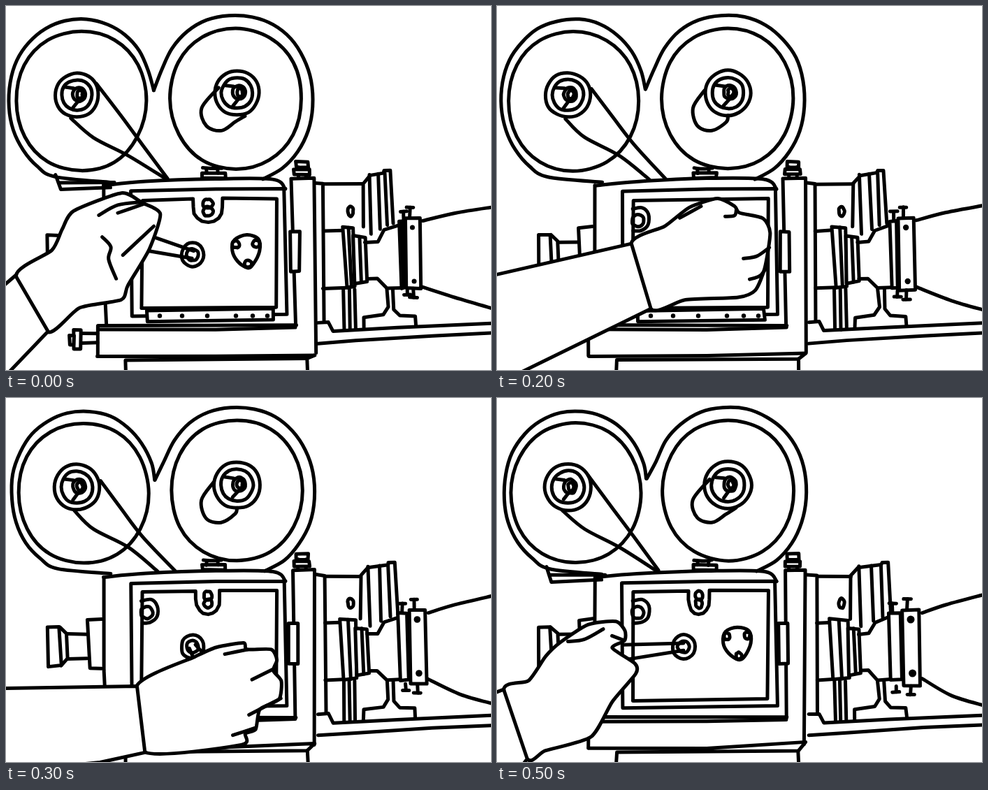
An HTML page with a canvas for the animation above (0.6 s loop, 694 by 521 pixels).

```html
<!DOCTYPE html>
<html lang="en">
<head>
<meta charset="utf-8">
<title>Hand-cranked film camera</title>
<style>
html, body { margin: 0; width: 100%; height: 100%; overflow: hidden; background: #fff; }
canvas { display: block; }
</style>
</head>
<body>
<canvas id="stage" width="694" height="521"></canvas>
<script>
const ctx = document.getElementById('stage').getContext('2d');
const { PI, sin, cos, sign, abs, hypot } = Math;

// Seeded wobble: every pose is inked anew
let seed = 1;
function wobble() {
  seed = seed * 16807 % 2147483647;
  return (seed / 2147483647 - .5) * 1.2;
}

// Inks a flat list x, y, x, y...; bend 0 is straight, 1/6 a smooth curve
function ink(flat, { bend = 0, closed = false, fill = false } = {}) {
  const p = [];
  for (let i = 0; i < flat.length; i += 2) p.push([flat[i] + wobble(), flat[i + 1] + wobble()]);
  const n = p.length;
  const at = i => closed ? p[(i + n) % n] : p[Math.max(0, Math.min(n - 1, i))];
  ctx.beginPath();
  ctx.moveTo(...p[0]);
  for (let i = 0; i < (closed ? n : n - 1); i++) {
    const [a, b, c, d] = [at(i - 1), at(i), at(i + 1), at(i + 2)];
    ctx.bezierCurveTo(b[0] + (c[0] - a[0]) * bend, b[1] + (c[1] - a[1]) * bend,
      c[0] - (d[0] - b[0]) * bend, c[1] - (d[1] - b[1]) * bend, c[0], c[1]);
  }
  if (closed) ctx.closePath();
  if (fill) { ctx.fillStyle = fill; ctx.fill(); }
  ctx.stroke();
}

const line = (...n) => ink(n);
const curve = (...n) => ink(n, { bend: 1 / 6 });
const patch = (...n) => ink(n, { closed: true, fill: '#fff' });
const box = (x, y, w, h) => patch(x, y, x + w, y, x + w, y + h, x, y + h);

// Points on a slightly squared ellipse, angles in degrees
function arc(x, y, rx, ry, from, to, steps = 14) {
  const round = v => sign(v) * abs(v) ** .96;
  return Array.from({ length: steps + 1 }, (_, i) => {
    const a = (from + (to - from) * i / steps) * PI / 180;
    return [x + rx * round(cos(a)), y + ry * round(sin(a))];
  }).flat();
}
const ring = (x, y, rx, ry = rx, fill = false) =>
  ink(arc(x, y, rx, ry, 0, 330, 11), { bend: 1 / 6, closed: true, fill });

function dot(x, y, r) {
  ctx.beginPath();
  ctx.arc(x, y, r, 0, 7);
  ctx.fillStyle = '#000';
  ctx.fill();
}

function screw(x, y, stem) {
  line(x - 5, y, x + 5, y);
  line(x, y, x, y + stem);
}

function hub(x, y, r) {
  for (const size of [1, .7]) ring(x, y, r * size);
  ring(x + 3, y - 1, 9, 10);
  ring(x + 4, y - 1, 4, 6);
  line(x - 17, y - 11, x - 5, y - 10);
  line(x - 6, y + 18, x + 1, y + 9);
}

// drift runs from -1 to 1 through the loop; slack is widest at mid-loop
function reels(drift, slack) {
  const notch = [213 + drift, 118 - 3 * drift];
  curve(...notch, ...arc(110 + 3 * drift, 135, 103, 116, -20, -250), 150, 252);
  curve(...notch, ...arc(330 + 2 * drift, 134, 111, 121, -160, 70));
  ring(110 + 2.5 * drift, 136, 93, 100);
  ring(330 + drift, 132.5, 94, 100.5);
  hub(101.5, 127.5, 32 + drift);
  hub(330.5, 124.5, 32.5 + drift);
  curve(304 - 8 * slack, 117 + 4 * slack, 280, 146, 287, 172, 308, 178, 328, 166, 342 - 12 * slack, 157);
  curve(130 + 5 * slack, 111 + 8 * slack, 165, 158, 196, 199, 231 + 11 * slack, 247);
  curve(93 + 5 * slack, 161, 125, 188, 175, 214, 229 - 12 * slack, 248);
}

function eyepiece() {
  patch(59, 328, 76, 328, 79, 383, 60, 385);
  line(77, 328, 87, 337, 88, 372, 79, 383);
  for (const y of [338, 373]) line(88, y, 116, y);
  line(137, 316, 117, 318, 120, 387, 137, 387);
}

function sidePlate() {
  line(71, 242, 78, 263, 150, 260);
  line(77, 253, 155, 253);
}

function sideKnob() {
  box(97, 464, 10, 27);
  box(91, 472, 6, 13);
  for (const y of [469, 482]) line(108, y, 131, y);
}

function hingeStrip() {
  patch(201, 436, 382, 433, 383, 449, 202, 452);
  for (const x of [220, 252, 288, 329, 353, 374]) dot(x, 443.5, 3.2);
}

function shield(drift) {
  ink([327, 335, 344, 328, 361, 334, 363, 351, 354, 369, 345, 375, 331, 365, 324, 350],
    { bend: 1 / 6, closed: true });
  const r = 4.5 - drift * .5;
  for (const [x, y] of [[329, 341], [358, 340], [346, 369]]) ring(x, y, r, 5, '#fff');
}

function crank([x, y]) {
  const [ax, ay] = [267, 356];
  const reach = hypot(x - ax, y - ay), nx = (y - ay) / reach, ny = (ax - x) / reach;
  for (const side of [-1, 1]) {
    line(ax + nx * 5 * side, ay + ny * 5 * side, x + nx * 11 * side, y + ny * 11 * side);
  }
  ring(ax, ay, 16, 17);
  ring(ax, ay, 8.5);
}

function body(drift, latch) {
  curve(282, 232, 295, 233, 308, 232);
  box(281, 239, 33, 7);
  for (const x of [287, 303]) line(x, 233, x, 239);
  curve(140, 257, 200, 251, 300, 247, 382, 248, 400, 262);
  line(140, 257, 140, 390, 144, 457);
  line(400, 262, 300, 262, 179, 265, 180, 444, 402, 441, 398, 262);

  const half = 18 - 3 * drift;
  const cup = latch ? arc(289, 288, half, 22, 180, 0, 8) : [];
  line(194, 433, 195, 278, ...(latch ? [289 - half, 276] : []), ...cup,
    ...(latch ? [289 + half, 275] : []), 388, 276, 387, 431, 194, 433);
  if (latch) for (const y of [283, 294]) ring(289, y, 6 - drift, 6.5);
  curve(194, 291, 208, 289, 217, 298, 216, 313, 207, 321, 195, 322);
  ring(201.5, 307, 8.5);

  line(131, 501, 131, 457, 415, 457);
  line(133, 463, 300, 463, 414, 460);
  line(131, 501, 300, 501, 442, 496 - 3.5 * drift, 431, 505, 171, 507, 171, 525);
  line(431, 505, 432, 525);
}

function post(drift) {
  const left = 410 + 2.5 * drift, right = 441;
  line(414, 458, left, 247, right, 246, 442 - 2 * drift, 496);
  line(right + 2, 253, 456 + 2 * drift, 254, 457 + 2 * drift, 450);
  box(415, 223, 17, 8);
  for (const x of [418, 429]) line(x, 231, x, 245);
  box(412, 234, 22, 7);
  box(405 - 2 * drift, 323, 13, 57);
}

function lens(drift) {
  const edge = 456 + 2 * drift;
  const hood = 508.5 - 2.5 * drift, rim = 555 + 5 * drift;
  const band = 478.5 - 3.5 * drift, bandEnd = band + 21 + 6 * drift;
  const collar = 516 + 2 * drift;
  const thin = 561.5 - 1.5 * drift, wide = 575.5 + 4.5 * drift;
  const front = 598 + 6 * drift, foot = 408 + 4 * drift;

  line(edge, 255, hood, 255);
  ring(493, 294, 4, 7);
  line(hood, 316, hood, 254, hood + 10, 243, rim - 10, 239, rim - 9, 235, rim, 235, rim + 4, 311);
  for (const part of [.22, .54, .8]) {
    const x = hood + (rim - hood) * part;
    line(x, 242 - 4 * part, x + 3, 331 - 22 * part);
  }

  line(edge, 322, band, 321);
  line(edge, 404, band + 6, 403);
  patch(band, 316, bandEnd, 318, bandEnd + 2, 401, band + 6, 403);
  line((band + bandEnd) / 2 + 1, 317, (band + bandEnd) / 2 + 5, 402);
  patch(bandEnd, 329, collar, 331, collar + 3, 394, bandEnd + 2, 397);
  line((bandEnd + collar) / 2, 330, (bandEnd + collar) / 2 + 3, 395);
  for (const x of [483, 491, 499]) line(x, 405, x + 1, 463);

  line(collar, 338, 532, 337, 541, 321, thin, 314);
  line(collar + 3, 390, 531, 390, 545, 404, thin + 3, 403);
  patch(thin, 308, wide - 3, 308, wide - 1, 403, thin + 3, 404);
  patch(wide, 304, front, 303, front + 2, foot, wide + 2, foot);
  for (const y of [317, 394]) dot((wide + front) / 2 + (y - 317) / 30, y, 4.5 + drift);
  screw(thin + 6, 294, 13);
  screw(wide + 7, 288, 14);
  screw(thin + 11, foot + 9, -9);
  screw(wide + 12, foot + 13, -13);

  curve(front + 4, 307, 643, 296, 698, 284 - 3 * drift);
  curve(front + 4, 402, 650, 423 + 3 * drift, 698, 437 + 3.5 * drift);
  line(545, 405, 547, 431, 540, 442, 512, 446, 512, 461);
  line(554, 405, 555, 434, 563, 443, 585, 444, 586, 457);
  line(446, 453, 461, 452, 468, 465, 560, 460, 698, 454);
  line(446, 483, 500, 479, 610, 472, 698, 468);
}

// The hand outline runs from the top of the cuff to its bottom;
// the sleeve goes on from there to the stage edge.
function arm({ hand, folds, sleeve: [top, x, y] }) {
  ink(hand, { bend: 1 / 9, closed: true, fill: '#fff' });
  for (const fold of folds) curve(...fold);
  patch(-9, top, ...hand.slice(0, 2), ...hand.slice(-2), x, y, -9, 535);
}

const poses = [
  { parts: [sidePlate, sideKnob, eyepiece, hingeStrip, shield], latch: true, grip: [203, 339],
    hand: [14, 386, 65, 350, 80, 320, 97, 293, 165, 268, 194, 281, 221, 297, 205, 348, 175, 400, 165, 420, 105, 432, 60, 466],
    folds: [[133, 300, 160, 285, 194, 281], [160, 296, 197, 283], [212, 315, 167, 357], [138, 331, 150, 345, 147, 362, 158, 390]],
    sleeve: [405, 3, 526] },
  { parts: [sidePlate, sideKnob, hingeStrip, shield], latch: true, grip: [245, 314],
    hand: [57, 335, 100, 310, 125, 262, 200, 228, 225, 213, 242, 213, 247, 230, 237, 248, 268, 258, 264, 281, 250, 290, 241, 338, 165, 385, 106, 410],
    folds: [[247, 230, 222, 250], [208, 267, 235, 253, 262, 254], [210, 300, 252, 287], [207, 333, 244, 317]],
    sleeve: [374, 10, 525] },
  { parts: [eyepiece, hingeStrip], latch: false, grip: [300, 340],
    hand: [192, 340, 240, 315, 275, 288, 315, 275, 340, 286, 347, 296, 380, 304, 391, 325, 383, 375, 370, 407, 345, 417, 270, 421, 220, 433],
    folds: [[326, 301, 340, 300, 343, 291], [353, 362, 372, 358, 390, 346], [362, 391, 376, 386, 386, 374], [262, 304, 292, 287]],
    sleeve: [386, 36, 524] },
  { parts: [eyepiece], latch: true, grip: [285, 385],
    hand: [187, 412, 270, 370, 300, 357, 340, 350, 344, 360, 380, 360, 387, 375, 382, 390, 394, 405, 391, 431, 363, 446, 357, 474, 342, 480, 337, 496, 199, 507],
    folds: [[313, 367, 346, 360], [352, 403, 385, 387], [348, 453, 393, 430], [325, 483, 358, 472]],
    sleeve: [416, 135, 522] },
  { parts: [eyepiece, shield], latch: true, grip: [283, 416],
    hand: [120, 446, 122, 462, 160, 455, 200, 428, 235, 415, 283, 413, 288, 423, 320, 420, 333, 436, 302, 457, 334, 466, 338, 490, 311, 501, 305, 532, 130, 532],
    folds: [[250, 429, 288, 424], [286, 459, 332, 443], [302, 459, 334, 466], [284, 501, 338, 492]],
    sleeve: [461, 125, 533] },
  { parts: [sidePlate, eyepiece, shield], latch: true, grip: [182, 364],
    hand: [10, 417, 45, 405, 70, 370, 90, 350, 130, 325, 170, 320, 183, 333, 182, 347, 165, 358, 198, 380, 198, 395, 165, 435, 135, 485, 70, 505, 43, 516],
    folds: [[102, 349, 125, 345, 152, 331], [182, 347, 165, 340]],
    sleeve: [424, 34, 528] }
];

function render(ms) {
  const step = Math.floor(ms / 100) % poses.length;
  const pose = poses[step];
  const turn = PI * step / (poses.length - 1);
  const drift = -cos(turn);
  seed = 4001 + step * 977;

  ctx.fillStyle = '#fff';
  ctx.fillRect(0, 0, 694, 521);
  ctx.lineWidth = 5;
  ctx.lineCap = ctx.lineJoin = 'round';
  reels(drift, sin(turn));
  body(drift, pose.latch);
  post(drift);
  lens(drift);
  for (const part of pose.parts) part(drift);
  crank(pose.grip);
  arm(pose);
}

const start = performance.now();
function tick() {
  render(performance.now() - start);
  requestAnimationFrame(tick);
}
tick();
</script>
</body>
</html>
```
